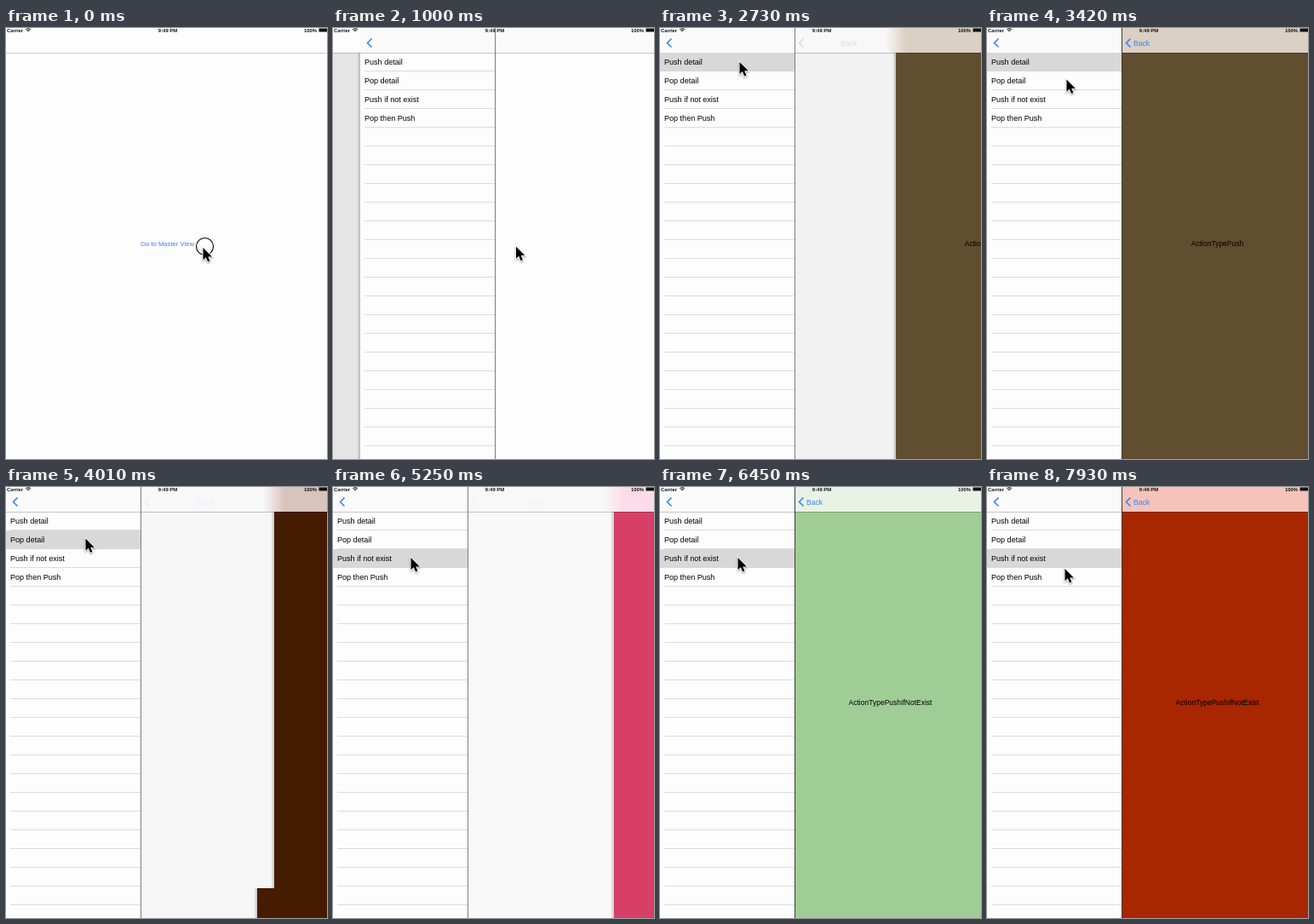
These frames come from a looping animation (377x506 px, 7.99 s). An HTML page with a canvas:

```html
<!DOCTYPE html>
<html>
<head>
<meta charset="utf-8">
<style>
  html, body { margin: 0; width: 100%; height: 100%; overflow: hidden; background: #fdfdfd; }
  canvas { display: block; }
</style>
</head>
<body>
<canvas id="stage" width="377" height="506"></canvas>
<script>
const W = 377, H = 506, LOOP = 7990, SPLIT = 159, BAR = 29, ROW = 22;
const BLUE = '#3b82f7', PAPER = '#fdfdfd';
const FONT = '"Liberation Sans", Arial, sans-serif';
const ctx = document.getElementById('stage').getContext('2d');

const ROWS = ['Push detail', 'Pop detail', 'Push if not exist', 'Pop then Push'];

// start time, selected row
const SELECTIONS = [[0, -1], [2580, 0], [3840, 1], [5180, 2]];

// start time, body colour, navigation bar colour, label
const PAGES = [
  [0, '#614d2f', '#dad0c3', 'ActionTypePush'],
  [3845, '#461c00', '#d8c4bc', 'ActionTypePush'],
  [4500, '#d83f66', '#fbdce8', 'ActionTypePushIfNotExist'],
  [6330, '#a0cd95', '#e8f3e5', 'ActionTypePushIfNotExist'],
  [7170, '#a82600', '#f5c3bb', 'ActionTypePushIfNotExist']
];

// time, x, y of the pointer tip
const POINTER = [
  [0, 231.5, 258], [60, 231.5, 258], [170, 217, 258], [650, 217, 258],
  [1400, 212.5, 255], [1460, 212.5, 255], [2090, 93.5, 39.5], [2680, 93.5, 39.5],
  [3200, 93.5, 54], [3250, 93.5, 54], [3420, 93.5, 60.5], [4610, 93.5, 60.5],
  [5050, 91.5, 83], [7750, 91.5, 83], [7930, 91.5, 96], [LOOP, 91.5, 96]
];

// from, to, centre of the tap ring
const TAPS = [
  [0, 120, 233.5, 256.5], [2440, 2600, 95.5, 39.5], [3780, 3900, 95.5, 62],
  [5070, 5200, 94, 84], [6270, 6420, 94, 84], [7110, 7290, 94, 84]
];

const latest = (list, t) => list.filter(item => item[0] <= t).pop();

// critically damped spring from 0 to 1
function spring(t, start) {
  const u = Math.max(0, t - start) * 0.017;
  return 1 - (1 + u) * Math.exp(-u);
}

function detailCover(t) {
  if (t < 3800) return spring(t, 2640);
  return t < 4500 ? 1 - spring(t, 3863) : spring(t, 5200);
}

function pointerAt(t) {
  const i = POINTER.findIndex(key => key[0] > t);
  const [t0, x0, y0] = POINTER[i - 1], [t1, x1, y1] = POINTER[i];
  const p = (t - t0) / (t1 - t0), e = p * p * (3 - 2 * p);
  return [x0 + (x1 - x0) * e, y0 + (y1 - y0) * e];
}

function box(x, y, w, h, fill) {
  ctx.fillStyle = fill;
  ctx.fillRect(x, y, w, h);
}

function text(str, x, y, size, fill = '#000', align = 'left', weight = '') {
  ctx.font = `${weight} ${size}px ${FONT}`;
  ctx.textAlign = align;
  ctx.fillStyle = fill;
  ctx.fillText(str, x, y);
}

function chevron(x) {
  ctx.beginPath();
  ctx.moveTo(x + 5, 12.5);
  ctx.lineTo(x, 17.5);
  ctx.lineTo(x + 5, 22.5);
  ctx.strokeStyle = BLUE;
  ctx.lineWidth = 1.6;
  ctx.stroke();
}

function fade(x0, x1, from, to) {
  const g = ctx.createLinearGradient(x0, 0, x1, 0);
  g.addColorStop(0, from);
  g.addColorStop(1, to);
  return g;
}

function drawStart() {
  box(0, 0, W, H, PAPER);
  box(0, BAR, W, 1, '#cdcdcd');
  text('Go to Master View', 158, 255.5, 7.7, BLUE);
}

function drawMaster(t) {
  box(0, 0, SPLIT, H, PAPER);
  box(0, 0, SPLIT, BAR, '#fafafa');
  box(0, BAR, SPLIT, 1, '#c4c4c4');
  for (let y = BAR + ROW - 1; y < H; y += ROW) box(5, y, SPLIT - 5, 1, '#dcdcdc');
  const row = latest(SELECTIONS, t)[1];
  if (row >= 0) box(0, BAR + row * ROW, SPLIT, ROW, '#d8d8d8');
  ROWS.forEach((name, i) => text(name, 5, 43 + i * ROW, 9.05));
  chevron(8.5);
}

function drawDetail(t) {
  const [, body, bar, label] = latest(PAGES, t);
  const cover = detailCover(t), width = W - SPLIT;
  const edge = c => Math.round(SPLIT + (1 - c) * width);
  const x = edge(cover);

  box(SPLIT, 0, width, H, PAPER);
  box(SPLIT, 0, width, BAR, '#fafafa');
  if (cover > 0.002) {
    box(SPLIT, BAR, width, H - BAR, `rgba(0,0,0,${0.1 * cover})`);
    const slab = (left, y, h) => {
      box(left - 4, y, 4, h, fade(left - 4, left, 'rgba(0,0,0,0)', 'rgba(0,0,0,.2)'));
      box(left, y, W - left, h, body);
    };
    // the lowest strip refreshes slightly late while popping
    const late = t > 3863 && t < 4300 ? edge(detailCover(t - 24)) : x;
    slab(x, BAR, 471 - BAR);
    slab(late, 471, H - 471);
    text(label, x + 111.5, 255.5, 8.53, '#000', 'center');

    const soft = 12 * Math.min(1, (x - SPLIT) / 20);
    box(SPLIT, 0, width, BAR, soft ? fade(x - soft, x + soft, '#f8f8f8', bar) : bar);
    ctx.globalAlpha = cover * cover;
    chevron(163.5);
    text('Back', 172 + 74 * (1 - cover), 21, 8.6, BLUE);
    ctx.globalAlpha = 1;
  }
  box(SPLIT, BAR, width, 1, 'rgba(0,0,0,.22)');
  box(SPLIT - 1, 0, 1, H, cover > 0.97 ? '#3c3a37' : '#7c7c7c');
}

function drawStatus() {
  text('Carrier', 1, 4.6, 5.8, '#111', 'left', 'bold');
  text('9:49 PM', 190, 4.6, 5.9, '#111', 'center', 'bold');
  text('100%', 350, 4.6, 5.9, '#111', 'left', 'bold');
  ctx.strokeStyle = '#111';
  ctx.lineWidth = 0.9;
  for (const r of [1.2, 2.7, 4.2]) {
    ctx.beginPath();
    ctx.arc(26.2, 4.8, r, -Math.PI * 0.77, -Math.PI * 0.23);
    ctx.stroke();
  }
  box(367.5, 0.5, 9.5, 4, '#111');
}

function drawPointer(t) {
  for (const [from, to, x, y] of TAPS) {
    if (t < from || t >= to) continue;
    ctx.beginPath();
    ctx.arc(x, y, 10, 0, 7);
    ctx.strokeStyle = '#000';
    ctx.lineWidth = 1.1;
    ctx.stroke();
  }
  ctx.save();
  ctx.translate(...pointerAt(t));
  const arrow = new Path2D('M0 0V14.2L3.3 11.2L5.6 16.6L8 15.6L5.7 10.4H10.4Z');
  ctx.shadowColor = 'rgba(0,0,0,.4)';
  ctx.shadowBlur = 2;
  ctx.shadowOffsetY = 1;
  ctx.strokeStyle = '#fff';
  ctx.lineWidth = 1.8;
  ctx.stroke(arrow);
  ctx.shadowColor = 'transparent';
  ctx.fillStyle = '#000';
  ctx.fill(arrow);
  ctx.restore();
}

function draw(t) {
  const shown = spring(t, 760);
  const shift = Math.round(W * (1 - shown));
  if (shift > 0) {
    ctx.save();
    ctx.translate(-W * 0.3 * shown, 0);
    drawStart();
    ctx.restore();
    box(W * (1 - 0.3 * shown), 0, W, H, PAPER);
    box(0, BAR, W, H - BAR, `rgba(0,0,0,${0.1 * shown})`);
  }
  if (shift < W) {
    ctx.save();
    ctx.translate(shift, 0);
    if (shift) box(-4, BAR, 4, H - BAR, fade(-4, 0, 'rgba(0,0,0,0)', 'rgba(0,0,0,.2)'));
    drawDetail(t);
    ctx.beginPath();
    ctx.rect(0, 0, SPLIT - 1, H);
    ctx.clip();
    drawMaster(t);
    ctx.restore();
  }
  drawStatus();
  drawPointer(t);
}

const begin = performance.now();
function tick() {
  draw((performance.now() - begin) % LOOP);
  requestAnimationFrame(tick);
}
tick();
</script>
</body>
</html>
```
